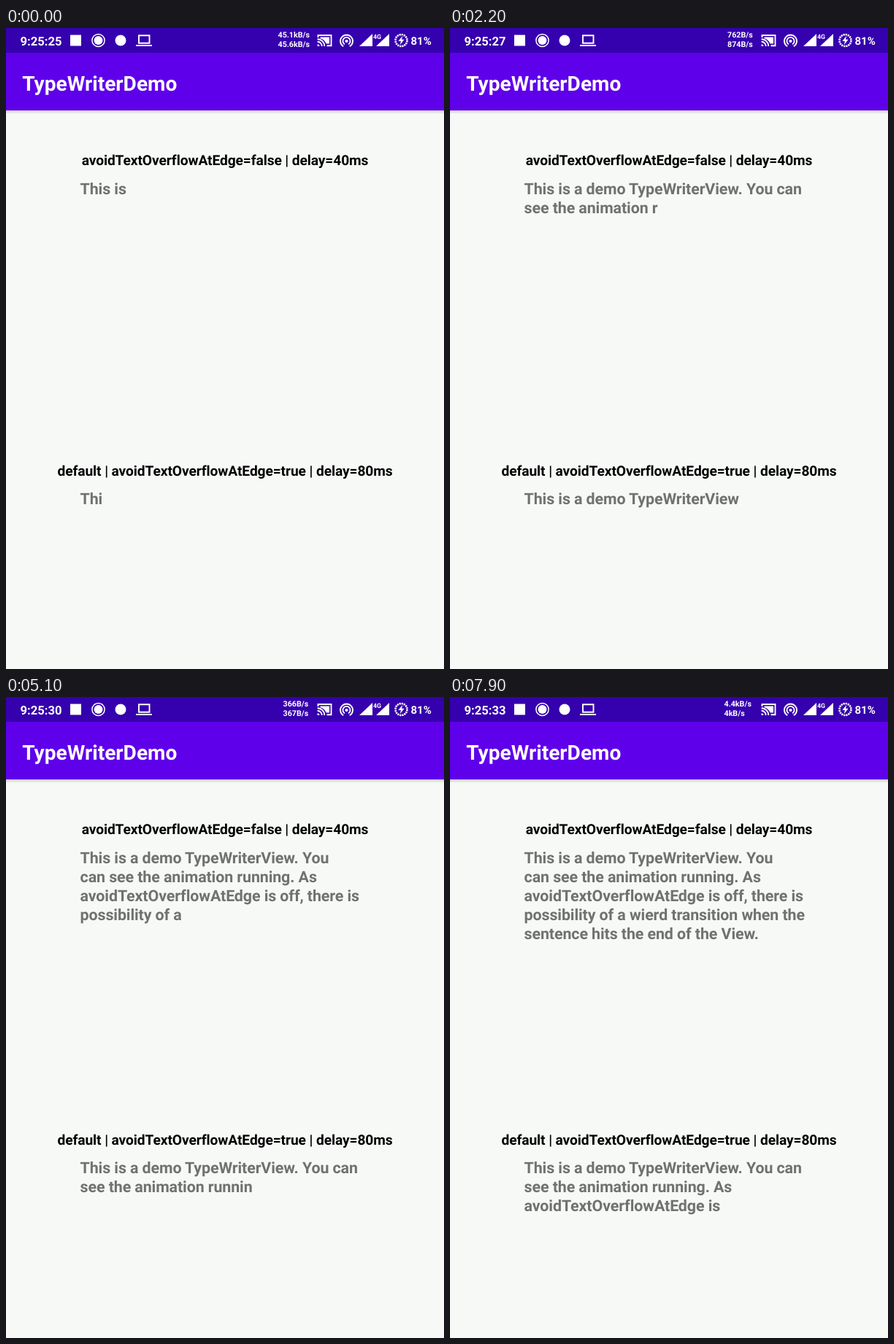
Animation, 600 px wide and 879 px high, one loop 8000 ms. Source, as an HTML page:

```html
<!DOCTYPE html>
<html lang="en">
<head>
<meta charset="utf-8">
<title>TypeWriterDemo</title>
<style>
  html, body { margin: 0; width: 100%; height: 100%; overflow: hidden; background: #f7f9f7; }
  svg { display: block; width: 600px; height: 879px; }
  text { font-family: Roboto, "Open Sans", sans-serif; font-weight: 700; text-rendering: geometricPrecision; }
  .bar { fill: #fff; }
  .line { fill: none; stroke: #fff; stroke-width: 1.9; }
  .head { font-size: 19.2px; letter-spacing: -.1px; text-anchor: middle; fill: #000; }
  .body { font-size: 21.4px; letter-spacing: -.1px; fill: #707170; }
  .net { font-size: 10.7px; }
</style>
</head>
<body>
<svg viewBox="0 0 600 879">
  <defs>
    <linearGradient id="shade" x2="0" y2="1">
      <stop offset="0" stop-color="#000" stop-opacity=".17"/>
      <stop offset="1" stop-color="#000" stop-opacity="0"/>
    </linearGradient>
  </defs>
  <rect width="600" height="879" fill="#f7f9f7"/>
  <rect y="113" width="600" height="5" fill="url(#shade)"/>
  <rect width="600" height="113" fill="#5f00ea"/>
  <rect width="600" height="34" fill="#3500ad"/>

  <g class="bar">
    <text id="clock" x="19.5" y="24" font-size="16.6"></text>

    <g id="icons">
      <rect x="88" y="9.5" width="15" height="15"/>
      <circle class="line" style="stroke-width:1.5" cx="126.5" cy="17" r="8.6"/>
      <circle cx="126.5" cy="17" r="6"/>
      <circle cx="157" cy="17" r="7.5"/>
      <path class="line" d="M182 10.2H196.5V20.8H182ZM178 24H200"/>
    </g>

    <g id="net" class="net">
      <text y="13"></text>
      <text y="26"></text>
    </g>

    <!-- cast -->
    <path class="line" d="M427.5 13V10H445.5V24.2H439.5"/>
    <path d="M430.5 12.6H443V21.6H438.6A12 12 0 0 0 430.5 14.2Z"/>
    <path class="line" d="M426.6 18.8A6.2 6.2 0 0 1 432.8 25M426.6 15.3A9.7 9.7 0 0 1 436.3 25"/>
    <path d="M426.6 22.2A2.8 2.8 0 0 1 429.4 25H426.6Z"/>

    <!-- hotspot -->
    <circle cx="466.5" cy="18" r="2.1"/>
    <path class="line" d="M463.9 22.4A5.1 5.1 0 1 1 469.1 22.4M462.2 25.3A8.5 8.5 0 1 1 470.8 25.3"/>

    <!-- signal -->
    <path d="M484 25L502 8V25ZM507 25L525 8V25Z"/>
    <text x="503" y="15" font-size="8.8">4G</text>

    <!-- battery -->
    <circle class="line" style="stroke-width:2.6" cx="541.5" cy="17" r="8" stroke-dasharray="2.2 .94"/>
    <path d="M543.2 10.8L537.4 18H540.9L539.8 23.2L545.6 15.8H542.1Z"/>
    <text x="554.5" y="23" font-size="15">81%</text>

    <text x="22.3" y="85.5" font-size="28.1">TypeWriterDemo</text>
  </g>

  <text class="head" x="300" y="188">avoidTextOverflowAtEdge=false | delay=40ms</text>
  <text class="head" x="300" y="613.7">default | avoidTextOverflowAtEdge=true | delay=80ms</text>
  <g id="fast" class="body"></g>
  <g id="slow" class="body"></g>
</svg>
<script>
const LOOP = 8000, STEP = 100;
const INTRO = "This is a demo TypeWriterView. You can see the animation running. As avoidTextOverflowAtEdge is ";
const $ = id => document.getElementById(id);

// wraps: [characters typed, line break positions]
const typers = [
  { id: "fast", y: 227.5, start: 7.5, delay: 42.9,
    text: INTRO + "off, there is possibility of a wierd transition when the sentence hits the end of the View.",
    wraps: [[0, []], [41, [39]], [79, [35, 69, 110, 153]]] },
  { id: "slow", y: 653, start: 3.7, delay: 85.5,
    text: INTRO, wraps: [[0, [39, 69]]] }
];

// [time, left edge, upper rate, lower rate]
const rates = [
  [0, 372.5, "45.1kB/s", "45.6kB/s"],
  [1000, 379.5, "427B/s", "475B/s"],
  [2000, 380, "762B/s", "874B/s"],
  [3600, 376.5, "4.3kB/s", "4.8kB/s"],
  [5000, 379.5, "366B/s", "367B/s"],
  [6300, 375.5, "4.4kB/s", "4kB/s"]
];

const latest = (table, value) => table.filter(row => row[0] <= value).pop();

for (const typer of typers) {
  typer.rows = Array.from({ length: 5 }, (_, i) => {
    const row = document.createElementNS("http://www.w3.org/2000/svg", "text");
    row.setAttribute("x", 101.6);
    row.setAttribute("y", typer.y + i * 26.1);
    return $(typer.id).appendChild(row);
  });
}

function type(typer, t) {
  const count = Math.min(typer.text.length, Math.floor(typer.start + t / typer.delay));
  const typed = typer.text.slice(0, count);
  const breaks = [0, ...latest(typer.wraps, count)[1]];
  typer.rows.forEach((row, i) => {
    row.textContent = i < breaks.length ? typed.slice(breaks[i], breaks[i + 1]).trim() : "";
  });
}

function draw(t) {
  typers.forEach(typer => type(typer, t));

  const second = 25 + Math.floor((t + 450) / 1000);
  $("clock").textContent = "9:25:" + second;
  $("icons").setAttribute("transform", `translate(${second === 31 ? -3 : 0} 0)`);

  const [, x, ...labels] = latest(rates, t);
  [...$("net").children].forEach((label, i) => {
    label.setAttribute("x", x);
    label.textContent = labels[i];
  });
}

const begin = performance.now();
function tick() {
  const t = (performance.now() - begin) % LOOP;
  draw(Math.floor(t / STEP) * STEP);
  requestAnimationFrame(tick);
}
tick();
</script>
</body>
</html>
```
